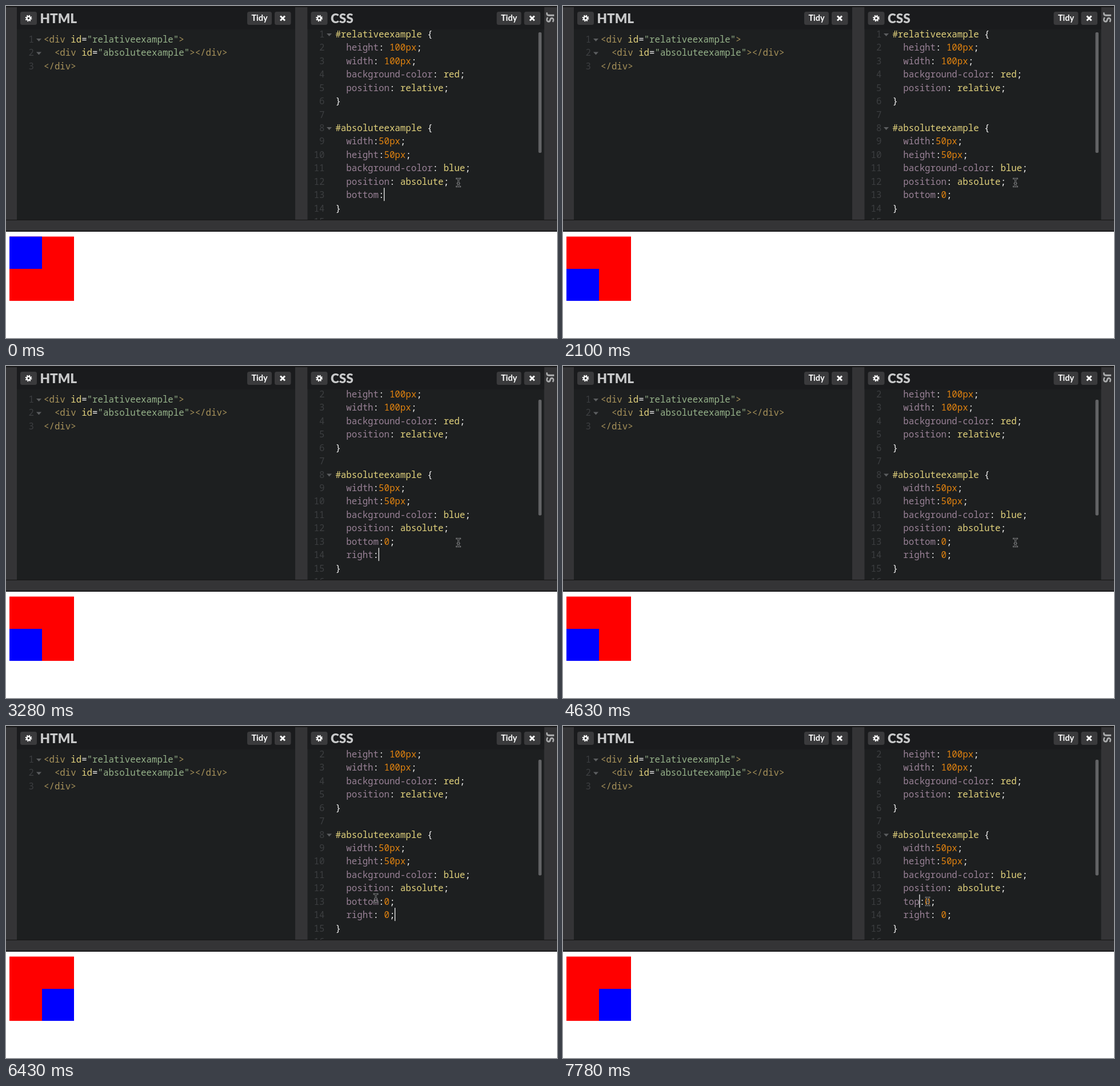
An HTML page for the animation above (8000 ms loop, 964 by 581 pixels).

```html
<!DOCTYPE html>
<html lang="en">
<head>
<meta charset="utf-8">
<title>Positioning demo</title>
<style>
  html, body { margin: 0; width: 100%; height: 100%; overflow: hidden; background: #fff; }
  svg { display: block; width: 964px; height: 581px; }
  .code text { font: 15.75px "Noto Sans Mono", "DejaVu Sans Mono", monospace; white-space: pre; }
  .title { font: 900 22.5px Lato, sans-serif; fill: #c8c9ca; }
  .button { font: 700 14.5px Lato, sans-serif; fill: #fff; text-anchor: middle; }
  .num { fill: #3c3e40; text-anchor: end; }
  .tag { fill: #a7925a; }
  .name { fill: #e2d27c; }
  .str { fill: #96b38a; }
  .prop { fill: #9a8297; }
  .val { fill: #e0820f; }
  .plain { fill: #f4f4f4; }
</style>
</head>
<body>
<svg id="stage" viewBox="0 0 964 581" xmlns="http://www.w3.org/2000/svg"></svg>
<script>
const LOOP = 8000;
const CHAR = 9.45, LINE = 23.43;
const CSS_X = 576.4, CSS_Y = 55;

const rect = (x, y, w, h, fill, extra = '') =>
  `<rect x="${x}" y="${y}" width="${w}" height="${h}" fill="${fill}" ${extra}/>`;
const span = (kind, text) => text &&
  `<tspan class="${kind}">${text.replace(/</g, '&lt;').replace(/>/g, '&gt;')}</tspan>`;
const row = (x, y, body) => `<text x="${x}" y="${y}">${body}</text>`;
const number = (n, x, y) => `<text class="num" x="${x}" y="${y}">${n}</text>`;
const fold = (x, y) => `<path d="M${x} ${y}h9l-4.5 5z" fill="#5c5e60"/>`;

function cssTokens(line) {
  if (line[0] === '#') return span('name', line.slice(0, -2)) + span('plain', ' {');
  const m = /^(\s*)([\w-]*)(:?\s*)(\w*)(;?)$/.exec(line);
  if (!m) return span('plain', line);
  const [, indent, prop, colon, value, end] = m;
  return span('plain', indent) + span('prop', prop) + span('plain', colon) +
    span(/^\d/.test(value) ? 'val' : 'name', value) + span('plain', end);
}

function htmlTokens(line) {
  return line.replace(/(\s*<\/?div)|(\s+id)|(=)|("[^"]*")|(>)/g, (all, tag, id, eq, str) =>
    span(id ? 'name' : eq ? 'plain' : str ? 'str' : 'tag', all));
}

function header(x, title, tidyX) {
  const gx = x + 14.5, cx = tidyX + 62;
  const box = (left, w) => rect(left, 10, w, 23, '#3a3a3c', 'rx="3.5"');
  return box(x, 29) + box(tidyX, 43) + box(tidyX + 48, 28.5) +
    `<g fill="none" stroke="#fff">
      <circle cx="${gx}" cy="21.5" r="3.1" stroke-width="2.4"/>
      <circle cx="${gx}" cy="21.5" r="4.9" stroke-width="2" stroke-dasharray="2 1.85"/>
      <path d="M${cx - 4} 17.5l8 8m0-8l-8 8" stroke-width="3"/>
    </g>
    <text class="title" x="${x + 34.5}" y="30">${title}</text>
    <text class="button" x="${tidyX + 21.5}" y="26.3">Tidy</text>`;
}

function panel(x, w) {
  return rect(x, 2, w, 372, '#1d1f20') + rect(x, 2, w, 39, '#1a1b1d');
}

const markup = [
  '<div id="relativeexample">',
  '  <div id="absoluteexample"></div>',
  '</div>'
];
const styles = [
  '#relativeexample {', '  height: 100px;', '  width: 100px;', '  background-color: red;',
  '  position: relative;', '}', '',
  '#absoluteexample {', '  width:50px;', '  height:50px;', '  background-color: blue;',
  '  position: absolute;'
];

const stage = document.getElementById('stage');
stage.innerHTML = `
  <defs><clipPath id="view"><rect x="528" y="41" width="413" height="333"/></clipPath></defs>
  ${rect(0, 0, 964, 395, '#343436')}
  ${rect(0, 0.5, 964, 1.5, '#111')}
  ${panel(19, 487)}${panel(527.5, 414)}
  ${rect(0, 374, 964, 1, '#151515')}${rect(0, 393, 964, 2, '#19191b')}
  ${rect(0, 395, 964, 186, '#fff')}
  ${header(25, 'HTML', 422)}${header(533.5, 'CSS', 858.5)}
  <text class="title" transform="translate(944.5 11) rotate(90)" style="font-size:18.5px;fill:#aaabac">JS</text>
  <g class="code">
    ${markup.map((line, i) => {
      const y = 64 + i * LINE;
      return number(i + 1, 49, y) + (i < 2 ? fold(53, y - 7) : '') + row(66, y, htmlTokens(line));
    }).join('')}
  </g>
  <g class="code" clip-path="url(#view)"><g id="sheet">
    ${Array.from({ length: 16 }, (_, i) => number(i + 1, 557.5, CSS_Y + i * LINE)).join('')}
    ${fold(561, 48)}${fold(561, 48 + 7 * LINE)}
    ${styles.map((line, i) => row(CSS_X, CSS_Y + i * LINE, cssTokens(line))).join('')}
    ${rect(CSS_X + 2 * CHAR, 318.4, 6 * CHAR, LINE, '#47484a', 'id="selection"')}
    <g id="typed"></g>
    ${rect(0, 0, 1.2, 23, '#fff', 'id="caret"')}
  </g></g>
  ${rect(931.5, 46, 5.5, 211, '#626365', 'id="thumb" rx="2"')}
  ${rect(6, 403.5, 113, 112.5, '#f00')}
  ${rect(6, 403.5, 57, 56.5, '#00f', 'id="box"')}
  <g id="pointer" fill="none" stroke-linecap="square">
    <path id="beam" d="M-3 -7q3 0 3 2v10q0 2 -3 2M3 -7q-3 0 -3 2m0 10q0 2 3 2M-1.5 1.5h3" stroke="#9b9c9d" stroke-width="2.6"/>
    <use href="#beam" style="display:none"/>
    <path d="M-3 -7q3 0 3 2v10q0 2 -3 2M3 -7q-3 0 -3 2m0 10q0 2 3 2M-1.5 1.5h3" stroke="#17181a" stroke-width="1.2"/>
  </g>`;
stage.querySelector('use').remove();

// Each track holds [start, value...] steps; the latest started step applies.
const line13 = [[0, 'bottom:'], [300, 'bottom:0'], [450, 'bottom:0;'],
  [7330, 't:0;'], [7630, 'to:0;'], [7780, 'top:0;']];
const line14 = [[0, ''], [2690, 'r'], [2840, 'ri'], [2980, 'rig'], [3130, 'righ'], [3280, 'right:'],
  [3580, 'right: '], [3730, 'right: 0'], [4030, 'right: 0;']];
const caretLine = [[0, 13], [2400, 14], [6880, 13]];
const caretColumn = [[0, 9], [300, 10], [450, 11], [2400, 2], [2690, 3], [2840, 4], [2980, 5],
  [3130, 6], [3280, 8], [3580, 9], [3730, 10], [4030, 11], [6880, 7], [7030, 8],
  [7330, 3], [7630, 4], [7780, 5]];
const caretShown = [[0, 1], [1050, 0], [1500, 1], [2100, 0], [2400, 1], [4630, 0], [5080, 1],
  [5680, 0], [6130, 1], [6730, 0], [6880, 1]];
const pointer = [[0, 791.5, 309], [5830, 760, 287], [5980, 703, 272], [6130, 657, 297],
  [6430, 647, 301], [6580, 640, 305], [6730, 638, 307]];
const boxSpot = [[0, 6, 403.5], [1350, 6, 460], [4930, 63, 460]];

const at = (track, t) => track.filter(step => step[0] <= t).pop().slice(1);
const byId = id => document.getElementById(id);
const set = (id, attrs) => {
  for (const key in attrs) byId(id).setAttribute(key, attrs[key]);
};

function render(t) {
  const scrolled = t >= 2400;
  const tail = ['  ' + at(line13, t)[0], ...(scrolled ? ['  ' + at(line14, t)[0]] : []), '}'];
  byId('typed').innerHTML = tail.map((line, i) =>
    row(CSS_X, CSS_Y + (12 + i) * LINE, cssTokens(line))).join('');
  set('sheet', { transform: `translate(0 ${scrolled ? -LINE : 0})` });
  set('thumb', scrolled ? { y: 59, height: 202.5 } : { y: 46, height: 211 });
  set('selection', { visibility: t >= 7030 && t < 7330 ? 'visible' : 'hidden' });
  set('caret', {
    x: CSS_X + at(caretColumn, t)[0] * CHAR - 0.4,
    y: 318.2 + (at(caretLine, t)[0] - 13) * LINE,
    visibility: at(caretShown, t)[0] ? 'visible' : 'hidden'
  });
  const [x, y] = at(boxSpot, t);
  set('box', { x, y, width: x > 6 ? 56 : 57, height: y > 404 ? 56 : 56.5 });
  set('pointer', { transform: `translate(${at(pointer, t).join(' ')})` });
}

const start = performance.now();
function tick() {
  render((performance.now() - start) % LOOP);
  requestAnimationFrame(tick);
}
render(0);
requestAnimationFrame(tick);
</script>
</body>
</html>
```
